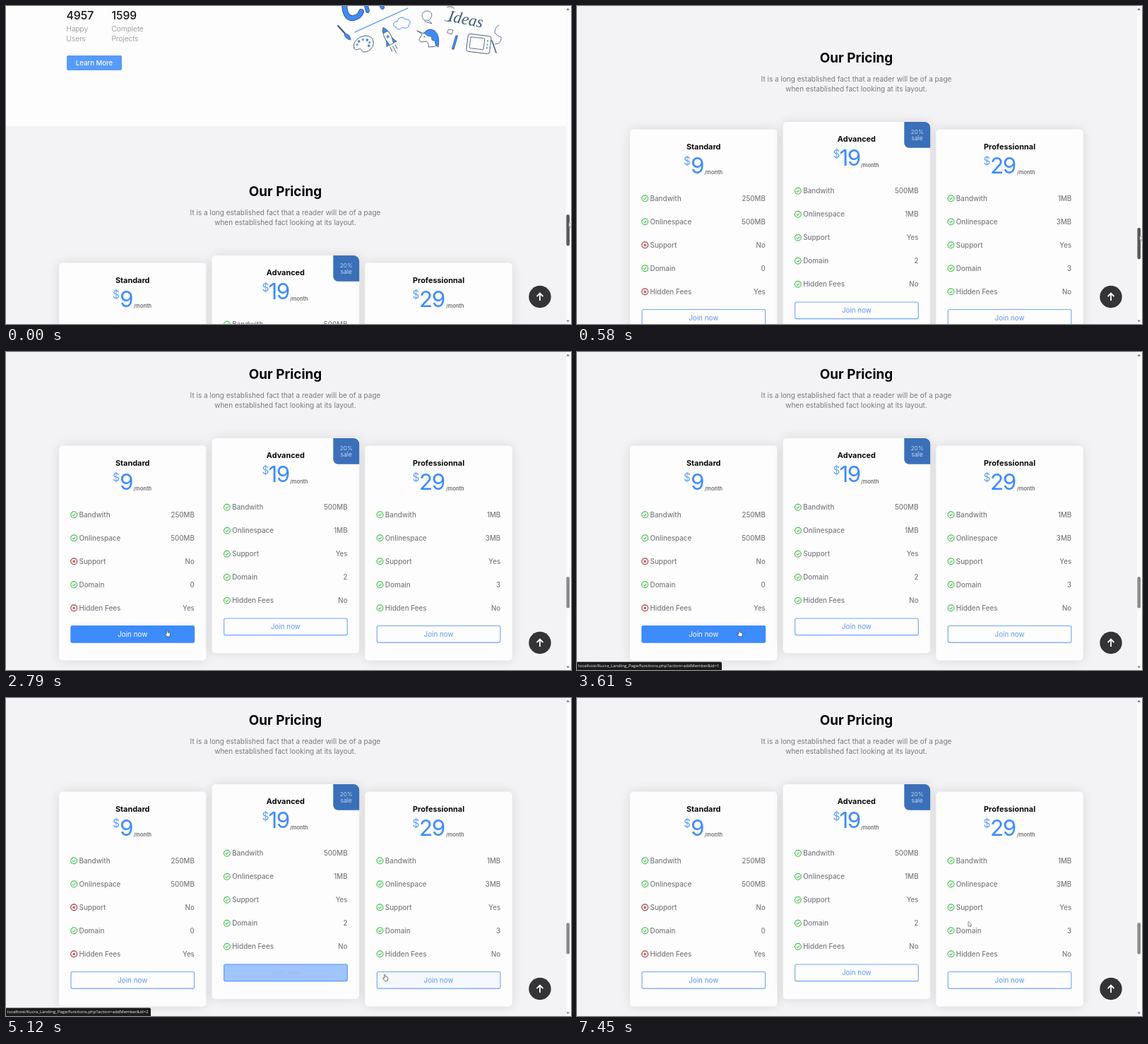
Animation, 800 px wide and 450 px high, one loop 7480 ms. Source, as an HTML page with a canvas:

```html
<!DOCTYPE html>
<html lang="en">
<head>
<meta charset="utf-8">
<title>Our Pricing</title>
<style>
html, body { margin: 0; width: 100%; height: 100%; overflow: hidden; background: #fdfdfd; }
canvas { display: block; width: 800px; height: 450px; }
</style>
</head>
<body>
<canvas id="stage"></canvas>
<script>
const LOOP = 7480;
const SANS = 'Inter, sans-serif';
const BLUE = '#3d8bfd', INK = '#3f5a75', GREY = '#7b7a7e';
const START = 231, NOTCH = 4.2;

const canvas = document.getElementById('stage');
const ctx = canvas.getContext('2d');
const dpr = window.devicePixelRatio || 1;
canvas.width = 800 * dpr;
canvas.height = 450 * dpr;

const clamp = v => Math.max(0, Math.min(1, v));
const ramp = (t, a, b) => clamp((t - a) / (b - a));
const smooth = v => v * v * (3 - 2 * v);

const cards = [
  { x: 75, y: 132.5, name: 'Standard', price: '9', px: 151, nx: 161, mx: 180.5,
    rows: ['250MB', '500MB', 'No', '0', 'Yes'], bad: [2, 4], hover: [2500, 3990] },
  { x: 291.7, y: 122, name: 'Advanced', price: '19', px: 362.5, nx: 371.5, mx: 402,
    rows: ['500MB', '1MB', 'Yes', '2', 'No'], bad: [], hover: [4060, 5020], sale: true },
  { x: 508.3, y: 132.5, name: 'Professionnal', price: '29', px: 575.5, nx: 585, mx: 623,
    rows: ['1MB', '3MB', 'Yes', '3', 'No'], bad: [], hover: [5110, 5690] }
];
const features = ['Bandwith', 'Onlinespace', 'Support', 'Domain', 'Hidden Fees'];

// time, x, y of the pointer once the scrollbar is released
const path = [
  [1670, 797, 329], [2400, 243, 378], [2560, 229, 392], [2790, 226, 394], [3800, 228, 394],
  [4250, 424, 387], [4420, 425, 387], [4800, 427, 388], [5380, 612, 394], [5560, 606, 394],
  [5880, 573, 369], [6240, 575, 358], [6650, 584, 336], [7000, 565, 343], [7450, 554, 316]
];

function text(str, x, y, size, color, weight = 400, align = 'left', family = SANS) {
  ctx.font = `${weight} ${size}px ${family}`;
  ctx.fillStyle = color;
  ctx.textAlign = align;
  ctx.fillText(str, x, y);
}

function box(x, y, w, h, r, fill, stroke, lw = 1) {
  ctx.beginPath();
  ctx.roundRect(x, y, w, h, r);
  if (fill) { ctx.fillStyle = fill; ctx.fill(); }
  if (stroke) { ctx.strokeStyle = stroke; ctx.lineWidth = lw; ctx.stroke(); }
}

function draw(d, stroke, lw = 1, fill) {
  const p = new Path2D(d);
  if (fill) { ctx.fillStyle = fill; ctx.fill(p); }
  if (stroke) { ctx.strokeStyle = stroke; ctx.lineWidth = lw; ctx.stroke(p); }
}

function at(x, y, angle, fn) {
  ctx.save();
  ctx.translate(x, y);
  ctx.rotate(angle);
  fn();
  ctx.restore();
}

function dot(x, y, r, fill) {
  ctx.beginPath();
  ctx.arc(x, y, r, 0, 7);
  ctx.fillStyle = fill;
  ctx.fill();
}

function doodles() {
  ctx.save();
  ctx.lineCap = ctx.lineJoin = 'round';
  // lettering and underline
  draw('M479 -6 Q479 19 492 17 Q501 15 503 8', INK, 8);
  draw('M479 -6 Q479 19 492 17 Q501 15 503 8', BLUE, 6);
  draw('M509 -4 L512 7 M529 -6 L533 2', INK, 6);
  draw('M509 -4 L512 7 M529 -6 L533 2', BLUE, 4.4);
  draw('M494 37 L569 3', BLUE, 1.3);
  at(621, 16, 0.2, () => {
    text('Ideas', 5, 4, 23, INK, 'italic 400', 'left', '"Liberation Serif", serif');
    draw('M1 -15 Q6 -18 11 -15 M1 4 Q4 6 10 3', INK, 0.8);
  });
  // brush
  draw('M470 28 L480 39', INK, 2.2);
  draw('M480 39 Q488 40 488 48 Q481 47 479 41 Z', INK, 0.7, BLUE);
  // palette
  at(506, 54, -0.25, () => {
    draw('M-14 2 C-15 -11 8 -16 14 -5 C17 5 8 13 -2 11 C-6 10 -3 5 -7 5 C-10 5 -13 7 -14 2 Z', INK, 0.9);
    for (let i = 0; i < 6; i++) {
      const a = -2.9 + i * 0.72;
      dot(Math.cos(a) * 9, Math.sin(a) * 6.5, 1.8, i % 2 ? BLUE : '#93a5b8');
    }
  });
  // rocket
  at(542, 46, -0.48, () => {
    draw('M0 -17 C6 -10 5 2 3.5 9 L-3.5 9 C-5 2 -6 -10 0 -17 Z', INK, 0.9, '#fdfdfd');
    draw('M0 -17 Q3 -14 3.8 -10 L-3.8 -10 Q-3 -14 0 -17 Z M-4.5 1 L-8 9 L-3.5 8 Z M4.5 1 L8 9 L3.5 8 Z', INK, 0.7, BLUE);
    draw('M-4 12 L-4 18 M0 12 L0 23 M4 12 L4 18', INK, 0.9);
    dot(0, -3, 2, BLUE);
  });
  // cloud
  draw('M552 30 C546 28 549 21 554 22 C555 15 564 15 565 19 C571 17 575 24 570 27 C571 32 563 32 561 30 C559 34 553 34 552 30 Z', BLUE, 1);
  // bulb
  draw('M592 20 C586 14 590 7 596 7 C604 7 605 15 599 20 Z M593 22 L603 25 L599 21', INK, 0.8);
  // unicorn
  draw('M582 35 L592 39 Q597 32 604 34 Q613 39 612 55 Q605 59 598 58 Q599 52 595 50 L588 51 Q583 49 587 44 L589 40 Z', INK, 0.9, '#fdfdfd');
  draw('M592 38 Q598 30 607 35 Q615 42 612 58 Q606 55 608 49 Q601 50 603 43 Q597 44 592 38 Z', INK, 0.8, BLUE);
  dot(592.5, 43.5, 0.9, INK);
  // pencil, square
  draw('M638 43 L633 60', INK, 3.6);
  draw('M638 43 L633 59', BLUE, 2.4);
  draw('M627 33 L633 34 L631 40 L625 38 Z', INK, 0.8);
  // tablet with cable and pen
  at(669, 53, 0.12, () => {
    box(-16, -12, 33, 25, 3, '#fdfdfd', INK, 0.9);
    box(-12, -8, 20, 16, 1, null, INK, 0.8);
    for (let i = -1; i < 2; i++) dot(12.5, i * 5, 1.1, BLUE);
  });
  draw('M692 54 Q702 54 701 44 Q696 43 692 38 Q692 30 698 27', INK, 0.8);
  draw('M688 49 L694 66', INK, 1.5);
  ctx.restore();
}

function intro() {
  text('4957', 85.5, 19, 15.8, '#111', 500);
  text('1599', 149.5, 19, 15.6, '#111', 500);
  [['Happy', 85.5, 35.5], ['Users', 85.5, 49.5], ['Complete', 149.5, 35.5], ['Projects', 149.5, 49.5]]
    .forEach(([s, x, y]) => text(s, x, y, 10.1, '#88878b', 300));
  box(86, 70, 78, 21, 2, '#579bfb');
  text('Learn More', 125, 84, 9.6, '#fff', 450, 'center');
  doodles();
}

function mark(x, y, bad) {
  const color = bad ? '#ac3537' : '#45bf4e';
  ctx.beginPath();
  ctx.arc(x, y, 4.4, 0, 7);
  ctx.strokeStyle = color;
  ctx.lineWidth = 1.15;
  ctx.stroke();
  at(x, y, 0, () => draw(bad ? 'M-1.5 -1.5 L1.5 1.5 M1.5 -1.5 L-1.5 1.5' : 'M-2.1 0 L-0.6 1.5 L2.1 -1.4', color, 1.1));
}

function card(c, t) {
  const { x, y } = c, mid = x + 104.2;
  ctx.save();
  ctx.shadowColor = 'rgba(0,0,0,.11)';
  ctx.shadowBlur = 16 * dpr;
  box(x, y, 208.5, 304, 5, '#fefdfe');
  ctx.restore();

  if (c.sale) {
    box(463.3, y, 36.9, 36.7, [0, 8, 0, 7], '#3b70b9');
    text('20%', 481.7, y + 17.3, 8.2, '#e6eefa', 300, 'center');
    text('sale', 481.7, y + 26, 8.7, '#e6eefa', 300, 'center');
  }
  text(c.name, mid, y + 28, 10.9, '#0b0b0c', 700, 'center');
  text('$', c.px, y + 50.5, 15.5, '#5fa1fa');
  ctx.letterSpacing = '-1.5px';
  text(c.price, c.nx, y + 62, 31.5, BLUE, 380);
  ctx.letterSpacing = '0px';
  text('/month', c.mx, y + 63.5, 7.4, '#6f6e72', 600);

  features.forEach((f, i) => {
    const ry = y + 97.8 + i * 33;
    mark(x + 21.2, ry, c.bad.includes(i));
    text(f, x + 28.5, ry + 3.6, 9.9, GREY, 450);
    text(c.rows[i], x + 191.8, ry + 3.6, 9.7, GREY, 450, 'right');
  });

  const [on, off] = c.hover;
  const h = ramp(t, on, on + 250) * (1 - ramp(t, off, off + 200));
  box(x + 17, y + 255, 174.6, 23.6, 2, null, '#6da5f5', 1.1);
  text('Join now', mid, y + 270.3, 9.8, '#5c98ee', 400, 'center');
  if (h > 0) {
    ctx.globalAlpha = h;
    box(x + 16.5, y + 254.5, 175.6, 24.6, 2.5, BLUE);
    text('Join now', mid, y + 270.3, 9.8, '#fff', 400, 'center');
    ctx.globalAlpha = 1;
  }
}

function scrollbar(left, held) {
  ctx.fillStyle = '#fbfbfb';
  ctx.fillRect(793.2, 0, 6.8, 450);
  draw('M793.3 6 L798 6 L795.6 2.6 Z M793.3 444.4 L798 444.4 L795.6 447.8 Z', null, 0, '#858585');
  box(793.4, 318 - left / 10, 4.6, 44.5, 2.3, held ? '#5a5a5a' : '#8b8b8b');
}

function status(t) {
  const a = ramp(t, 3210, 3330) * (1 - ramp(t, 5900, 6060));
  if (!a) return;
  const id = t < 4090 ? 1 : t < 5140 ? 2 : 3;
  ctx.globalAlpha = a;
  box(0, 438.6, 205, 12, [0, 2, 0, 0], '#1c1c1c');
  text('localhost/Kucra_Landing_Page/functions.php?action=addMember&id=' + id,
    2, 446.4, 6, '#f2f2f2', 400, 'left', '"Open Sans", sans-serif');
  ctx.globalAlpha = 1;
}

function pointer(t, left) {
  let x = 797, y = 329 - left / 10;
  for (let i = 1; i < path.length; i++) {
    const [t0, x0, y0] = path[i - 1], [t1, x1, y1] = path[i];
    if (t < t0) break;
    const k = smooth(ramp(t, t0, t1));
    x = x0 + (x1 - x0) * k;
    y = y0 + (y1 - y0) * k;
  }
  const hand = cards.some(c => x > c.x + 17 && x < c.x + 191 && y > c.y + 254.5 && y < c.y + 278);
  at(x, y, 0, () => {
    if (hand) {
      draw('M1.5 0 Q2.6 -0.6 3 .6 L3.2 3 L5.4 3.3 Q6.8 3.6 6.6 5 L6 8.8 L2 8.8 L-.6 5.6 Q-.6 4.4 .6 4.8 L1.2 5.2 Z',
        '#333', 0.7, '#fff');
    } else {
      draw('M0 0 L0 7.2 L1.7 5.6 L2.8 8 L4 7.5 L2.9 5.1 L5 5 Z', '#666', 0.7, '#fff');
    }
  });
}

function render(t) {
  const left = t >= 1330 ? 0 : Math.round(START * (1 - t / 1330) ** 3 / NOTCH) * NOTCH;
  ctx.setTransform(dpr, 0, 0, dpr, 0, 0);
  ctx.fillStyle = '#fdfdfd';
  ctx.fillRect(0, 0, 800, 450);

  ctx.save();
  ctx.translate(0, left - START);
  ctx.fillStyle = '#f3f2f4';
  ctx.fillRect(0, 170, 793.2, 600);
  if (left > 60) intro();
  ctx.translate(0, START);
  text('Our Pricing', 395.5, 38.3, 18.9, '#080809', 700, 'center');
  text('It is a long established fact that a reader will be of a page', 395.5, 65, 10, GREY, 400, 'center');
  text('when established fact looking at its layout.', 395.5, 79, 10, GREY, 400, 'center');
  cards.forEach(c => card(c, t));
  ctx.restore();

  dot(756, 411.5, 15.7, '#343436');
  draw('M756 417 L756 407 M751.6 411 L756 406.6 L760.4 411', '#fff', 1.8);
  scrollbar(left, t < 1740);
  status(t);
  pointer(t, left);
}

const begin = performance.now();
function tick() {
  render((performance.now() - begin) % LOOP);
  requestAnimationFrame(tick);
}
tick();
</script>
</body>
</html>
```
